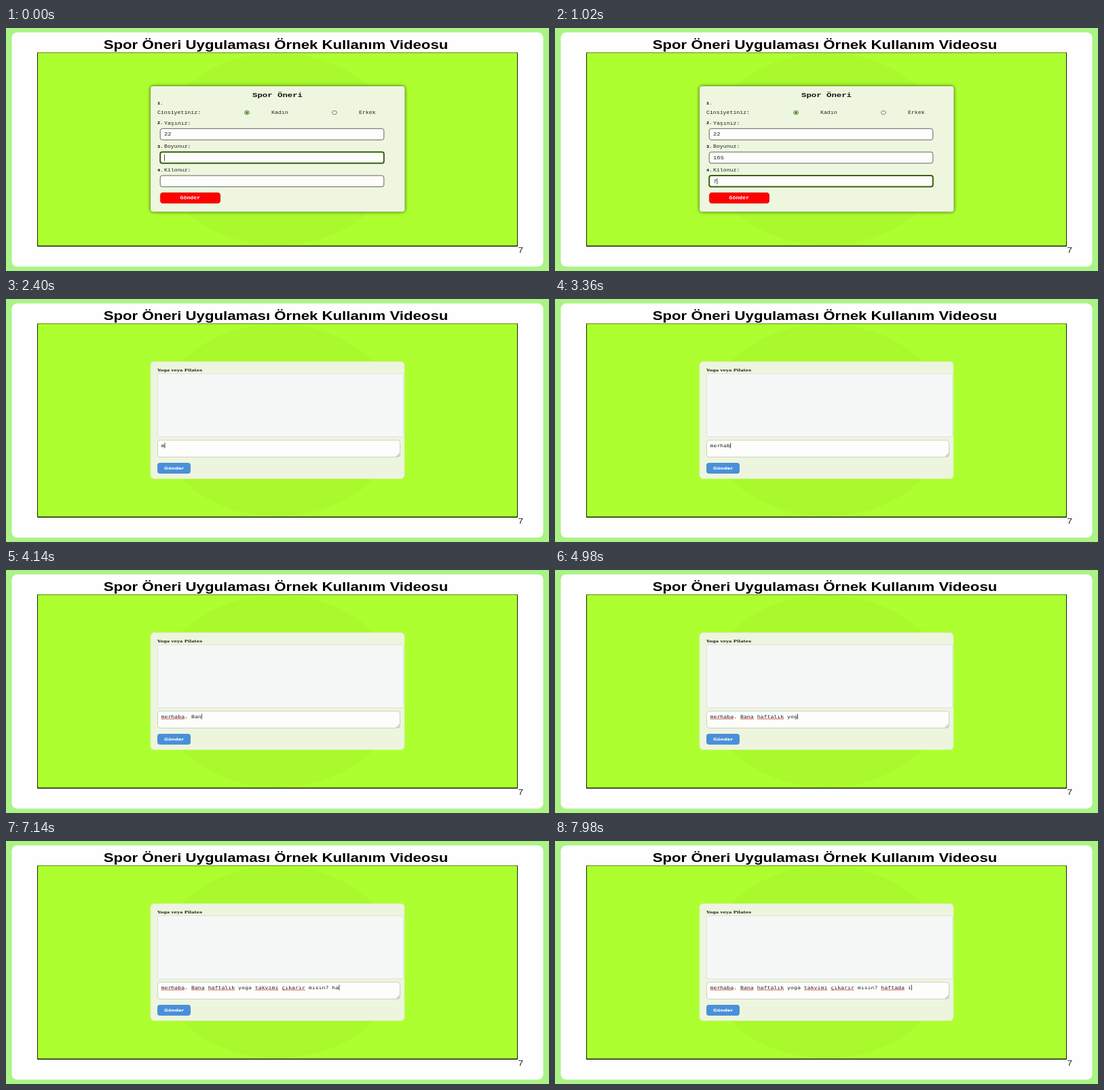
Animation, 800 px wide and 359 px high, one loop 8 s. Source, as an HTML page with a canvas:

```html
<!DOCTYPE html>
<html lang="tr">
<head>
<meta charset="utf-8">
<title>Spor Öneri</title>
<style>
  html, body { margin: 0; width: 100%; height: 100%; overflow: hidden; }
  canvas { display: block; }
</style>
</head>
<body>
<canvas id="stage" width="800" height="359"></canvas>
<script>
const ctx = document.getElementById('stage').getContext('2d');
const LOOP = 8000, STEP = 60, STRETCH = 1.25; // the slide is shown 1.25 times too wide
const SLAB = '"Liberation Mono", monospace';
const MONO = '"DejaVu Sans Mono", monospace';
const SANS = '"Liberation Sans", sans-serif';

const FORM_END = 1380, FOCUS = 1740, CHAR = 4.94;
const MESSAGE = 'merhaba. Bana haftalık yoga takvimi çıkarır mısın? haftada i';
const MISSPELT = ['merhaba', 'Bana', 'haftalık', 'takvimi', 'çıkarır', 'haftada'];
// [time, characters typed]
const TYPING = [[2160, 0], [2220, 1], [2640, 3], [2820, 4], [3060, 5], [3300, 6], [3480, 7],
  [3840, 9], [4020, 10], [4680, 22], [4860, 24], [4980, 26], [5640, 38], [6060, 48],
  [6420, 50], [6840, 51], [7020, 52], [7800, 59], [7860, 60], [LOOP, 60]];

function box(x, y, w, h, r, fill, stroke, line = 1) {
  ctx.beginPath();
  ctx.roundRect(x, y, w, h, r);
  if (fill) { ctx.fillStyle = fill; ctx.fill(); }
  if (stroke) { ctx.strokeStyle = stroke; ctx.lineWidth = line; ctx.stroke(); }
}

function text(str, x, y, font, color = '#222', align = 'left') {
  ctx.save();
  ctx.translate(x, y);
  ctx.scale(STRETCH, 1);
  ctx.font = font;
  ctx.fillStyle = color;
  ctx.textAlign = align;
  ctx.fillText(str, 0, 0);
  ctx.restore();
}

function ellipse(x, y, rx, ry, fill, stroke) {
  ctx.beginPath();
  ctx.ellipse(x, y, rx, ry, 0, 0, 7);
  ctx.fillStyle = fill;
  ctx.fill();
  if (stroke) { ctx.strokeStyle = stroke; ctx.lineWidth = 1; ctx.stroke(); }
}

function caret(x, y, h) {
  ctx.fillStyle = '#444';
  ctx.fillRect(x, y, 1, h);
}

function slide() {
  ctx.fillStyle = '#abf386';
  ctx.fillRect(0, 0, 800, 359);
  box(8.5, 6.5, 783, 346, 8, '#fefefe');
  text('Spor Öneri Uygulaması Örnek Kullanım Videosu', 397.5, 31.3, 'bold 17.75px ' + SANS, '#000', 'center');
  text('7', 754.5, 332, '11px ' + SANS, '#222');
  box(46, 36, 708, 287, 1, '#16230a');
  box(47, 36.5, 706, 285, 1, '#adff2f');
  ellipse(400, 179, 178, 142, '#a9f92d');
}

function field(number, label, value, y, focused) {
  text(number + '.', 223, y - 6.3, 'bold 5.5px ' + SLAB, '#000');
  text(label, 233, y - 6, '6.57px ' + SLAB);
  box(227.2, y, 329.6, 16.6, 3, '#fdfdfb', focused ? '#39600f' : '#62665c', focused ? 2 : 1);
  text(value, 233, y + 10.6, '7.1px ' + SLAB);
  if (focused) caret(233 + value.length * 5.33, y + 4, 9);
}

function radio(label, x, labelX, checked) {
  ellipse(x, 125, 3.4, 2.7, '#fff', checked ? '#3d7a12' : '#777');
  if (checked) ellipse(x, 125, 1.9, 1.5, '#3d7a12');
  text(label, labelX, 127, '6.57px ' + SLAB);
}

function profileForm(t) {
  ctx.save();
  ctx.shadowColor = 'rgba(20,50,0,.85)';
  ctx.shadowBlur = 5;
  box(213, 86, 374.5, 185.5, 4, '#eef6df');
  ctx.restore();
  text('Spor Öneri', 400, 102.3, 'bold 9.87px ' + SLAB, '#111', 'center');
  text('1.', 223, 113, 'bold 5.5px ' + SLAB, '#000');
  text('Cinsiyetiniz:', 223, 127, '6.57px ' + SLAB);
  radio('Kadın', 355, 391, true);
  radio('Erkek', 484, 520, false);

  const typed = (str, times) => str.slice(0, times.filter(at => t >= at).length);
  const onWeight = t >= 780;
  field(2, 'Yaşınız:', '22', 148.7, false);
  field(3, 'Boyunuz:', typed('165', [240, 360, 480]), 183.2, !onWeight);
  field(4, 'Kilonuz:', typed('70', [960, 1140]), 218, onWeight);

  ctx.setLineDash([2, 1]);
  box(227.3, 243.3, 88.4, 15.6, 4, '#f00', '#a01000', .7);
  ctx.setLineDash([]);
  text('Gönder', 271.3, 253.4, 'bold 6.57px ' + SLAB, '#fff', 'center');
}

function typedCount(t) {
  const i = TYPING.findIndex(([at]) => at > t);
  if (i < 1) return 0;
  const [t0, n0] = TYPING[i - 1], [t1, n1] = TYPING[i];
  return Math.floor(n0 + (n1 - n0) * (t - t0) / (t1 - t0) + 1e-6);
}

function underline(message) {
  for (const word of MISSPELT) {
    const start = message.indexOf(word);
    if (start < 0 || start + word.length >= message.length) continue;
    ctx.fillStyle = '#e0504c';
    ctx.fillRect(228.5 + start * CHAR, 219.6, word.length * CHAR, .9);
  }
}

function chatForm(t) {
  box(213, 92.5, 374, 173, 5, '#edf5de', '#d6eeb0');
  text('Yoga veya Pilates', 223, 107.3, 'bold 5.5px "DejaVu Serif", "Noto Serif", serif');
  box(223.5, 110.5, 362, 93, 1, '#f6f7f7', '#dfe3da');
  box(223.5, 208.5, 357, 25, 4, '#fdfefc', '#cbd0c4');
  ctx.beginPath();
  for (const d of [5, 2.5]) { ctx.moveTo(580 - d, 233); ctx.lineTo(580, 233 - d); }
  ctx.strokeStyle = '#777';
  ctx.lineWidth = .7;
  ctx.stroke();

  const message = MESSAGE.slice(0, typedCount(t));
  underline(message);
  text(message || 'Sorunuzu yazın...', 228.5, 218.8, '6.57px ' + MONO, message ? '#222' : '#8c8c8c');
  if (t >= FOCUS) caret(228.5 + message.length * CHAR, 212.5, 8);

  box(223, 242, 49, 16, 4, '#4a90d9');
  text('Gönder', 247.6, 252.2, 'bold 5.65px "DejaVu Sans", sans-serif', '#fff', 'center');
}

function draw(now) {
  const t = Math.floor(now % LOOP / STEP) * STEP;
  slide();
  (t < FORM_END ? profileForm : chatForm)(t);
  requestAnimationFrame(draw);
}
requestAnimationFrame(draw);
</script>
</body>
</html>
```
